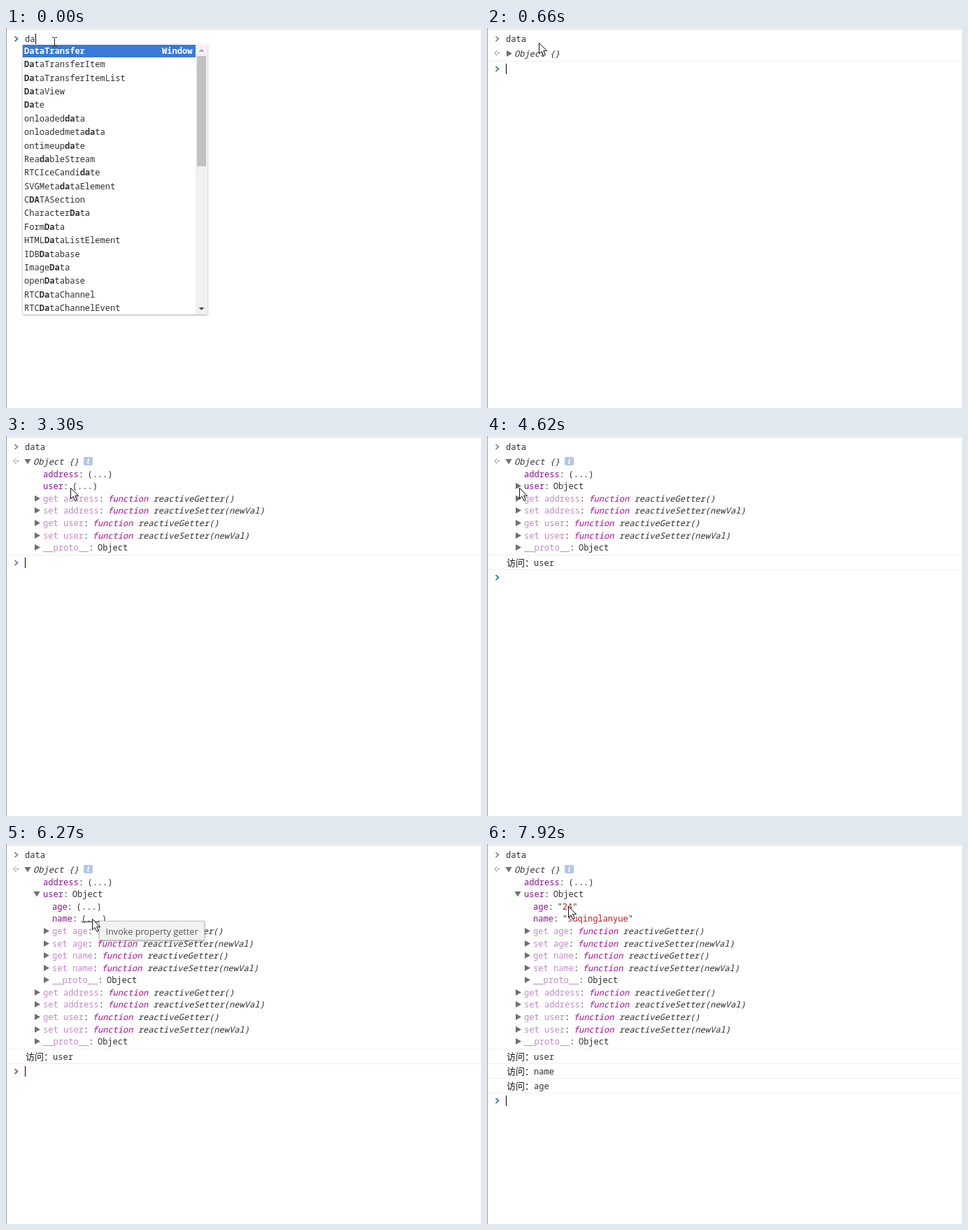
Animation of 679x544 px, one loop 8 s. Source, as an HTML page:

```html
<!DOCTYPE html>
<html lang="zh-CN">
<head>
<meta charset="utf-8">
<style>
html, body { margin: 0; height: 100%; overflow: hidden; background: #fff; }
svg { display: block; width: 100vw; height: 100vh; }
text { font: 12.07px "Noto Sans Mono", monospace; white-space: pre; fill: #303030; }
.b { font-weight: bold; }
.i { font-style: italic; }
.name { fill: #881391; }
.dim { fill: #c389c8; }
.key { fill: #aa0d91; }
.str { fill: #c41a16; }
.white { fill: #fff; }
.cjk { font: 13px "Noto Sans CJK SC", "Noto Sans CJK", sans-serif; fill: #111; }
.info { font: italic bold 11px "Noto Serif", serif; fill: #fff; }
.tip { font: 12.7px "Open Sans", sans-serif; fill: #575757; }
.popup, .tipbox { filter: drop-shadow(0 1px 1.5px rgba(0, 0, 0, .35)); }
</style>
</head>
<body>
<svg id="stage" viewBox="0 0 679 544"></svg>
<script>
const STEP = 330, LOOP = 8000, ROW = 17.57;
const stage = document.getElementById('stage');

// Pointer position at the step where it starts to hold
const pointer = {
  2: [74, 21], 5: [57, 23], 6: [30, 33], 7: [30, 35], 8: [83, 96], 9: [48, 75],
  10: [92, 74], 11: [106, 74], 13: [46, 76], 14: [46, 74], 15: [46, 73], 16: [88, 91],
  17: [107, 94], 19: [123, 107], 20: [233, 107], 21: [112, 98], 22: [116, 89]
};
const hover = { 11: 'user', 17: 'age', 18: 'age', 19: 'name', 22: 'age', 23: 'age' };
const tips = { 18: [114, 104], 19: [133, 110], 23: [129, 103] };
const caretOn = '1111011100111001001110011';
const promptColor = { 0: '#367cd8', 2: '#4b8a50', 7: '#7a78d2', 12: '#3f72b8', 15: '#9a4fa8', 20: '#3f6fc0' };

const early = ['DataTransfer', 'DataTransferItem', 'DataTransferItemList', 'DataView', 'Date',
  'onloadeddata', 'onloadedmetadata', 'ontimeupdate', 'ReadableStream', 'RTCIceCandidate',
  'SVGMetadataElement', 'CDATASection', 'CharacterData', 'FormData', 'HTMLDataListElement',
  'IDBDatabase', 'ImageData', 'openDatabase', 'RTCDataChannel', 'RTCDataChannelEvent'];
const late = early.filter(s => /data/i.test(s))
  .concat('defaultStatus', 'defaultstatus', 'MediaStreamEvent', 'MediaStreamTrack');

const text = (x, y, s, cls = '') => `<text x="${x}" y="${Math.round(y + 4)}" class="${cls}">${s}</text>`;
const span = (s, cls) => `<tspan class="${cls}">${s}</tspan>`;
const rect = (x, y, w, h, fill, more = '') =>
  `<rect x="${x}" y="${y}" width="${w}" height="${h}" fill="${fill}" ${more}/>`;
const path = (d, fill, more = '') => `<path d="${d}" fill="${fill}" ${more}/>`;
const rule = y => rect(1, y, 678, 1, '#f0f0f0');
const chevron = (y, color) =>
  path(`M12.5 ${y - 3.5}l4 3.5-4 3.5`, 'none', `stroke="${color}" stroke-width="1.7"`);
const closed = (x, y) => path(`M${x} ${y - 4.5}l8 4.5-8 4.5z`, '#6e6e6e');
const opened = (x, y) => path(`M${x} ${y - 3.5}h9l-4.5 7.5z`, '#6e6e6e');

// Latest entry at or before step n
const held = (map, n) => {
  while (n > 0 && !(n in map)) n--;
  return map[n];
};

function popup(typed, items) {
  let s = `<g class="popup">${rect(24, 23, 264, 387, '#fff')}</g>` +
    rect(24, 24, 247, 18, '#3879d9') + rect(271, 24, 17, 386, '#f1f1f1') +
    rect(273, 40, 13, typed === 'da' ? 158 : 230, '#c1c1c1') +
    path('M275.5 34l4-4 4 4z', '#a3a3a3') + path('M275.5 400l4 4 4-4z', '#505050');
  items.forEach((item, i) => {
    const label = i ? item.replace(new RegExp(typed, 'i'), m => span(m, 'b')) : item;
    s += text(26, 33 + i * 19.37, label, i ? '' : 'b white');
  });
  return s + text(223, 33, 'Window', 'b white');
}

const func = prop => [['get ' + prop, 'Getter()'], ['set ' + prop, 'Setter(newVal)']].map(([name, end]) => ({
  name, dim: true, arrow: closed, value: span('function', 'i key') + span(' reactive' + end, 'i')
}));
const proto = { name: '__proto__', dim: true, arrow: closed, value: 'Object' };
const quoted = s => `"${span(s, 'str')}"`;

function properties(n) {
  const lazy = (name, value) => value ? { name, value } : { name, value: '(...)', over: hover[n] === name };
  const nest = n < 15 ? [] : [
    lazy('age', n >= 24 && quoted('24')),
    lazy('name', n >= 20 && quoted('suqinglanyue')),
    ...func('age'), ...func('name'), proto
  ].map(p => ({ ...p, deep: true }));
  const user = lazy('user', n >= 12 && 'Object');
  if (n >= 12) user.arrow = n >= 15 ? opened : closed;
  return [lazy('address'), user, ...nest, ...func('address'), ...func('user'), proto];
}

function property(p, y) {
  const x = p.deep ? 66 : 53;
  const valueX = x + (p.name.length + 1) * 7.24 + 5.5;
  let s = text(x, y, span(p.name, p.dim ? 'dim' : 'name') + ':') + text(valueX, y, p.value);
  if (p.arrow) s += p.arrow(x - (p.arrow === opened ? 13.5 : 12), y - .5);
  if (p.over) s += rect(valueX, y + 4, 36, 1, '#303030');
  return s;
}

function arrowCursor([x, y]) {
  return path('M.5.5v15.5l3.6-3.4 2.6 5.9 2.6-1.1-2.6-5.7h5z', '#fff',
    `stroke="#111" transform="translate(${x} ${y})"`);
}

function tooltip([x, y]) {
  return `<g class="tipbox">${rect(x + .5, y + .5, 150, 27, '#f2f2f2', 'stroke="#c4c4c4"')}</g>` +
    text(x + 9.5, y + 15.5, 'Invoke property getter', 'tip');
}

function draw(n) {
  const color = held(promptColor, n);
  let s = rect(0, 0, 679, 544, '#fff') + rect(0, 1, 679, 1, '#d4d4d4') + rect(0, 0, 1, 544, '#a0a0a0');
  if (n < 2) {
    const typed = n ? 'data' : 'da';
    s += chevron(15.5, color) + text(27, 16, typed) + popup(typed, n ? late : early) +
      rect(n ? 56 : 42, 8, 1, 15, '#000') +
      path('M66 13.5h2.5l1 1 1-1h2.5M66 26.5h2.5l1-1 1 1h2.5M69.5 14.5v11', 'none', 'stroke="#222"');
    stage.innerHTML = s;
    return;
  }

  const open = n >= 7;
  s += chevron(15.5, '#8c8c8c') + text(27, 16, 'data') +
    path('M14.5 32.5l-3.5 3.5 3.5 3.5', 'none', 'stroke="#b4b4b4" stroke-width="1.4"') +
    rect(15, 35, 3, 2, '#b4b4b4') +
    (open ? opened(26.5, 36.5) : closed(28, 36.5)) + text(39, 37, 'Object {}', 'i');

  let y = 47;
  if (open) {
    s += rect(111, 30, 13, 12, '#b3c5ec', 'rx="2"') + text(115.5, 36, 'i', 'info');
    const list = properties(n);
    list.forEach((p, i) => s += property(p, Math.floor(55.2 + i * ROW)));
    y = Math.round(47 + list.length * ROW);
  }
  s += rule(y);
  [[12, 'user'], [20, 'name'], [24, 'age']].forEach(([from, prop]) => {
    if (n < from) return;
    s += text(28, y + 11.5, '访问：', 'cjk') + text(67, y + 11.5, prop);
    s += rule(y += 21);
  });
  s += chevron(y + 11.5, color);
  if (caretOn[n] === '1') s += rect(27, y + 4, 1, 15, '#000');
  if (tips[n]) s += tooltip(tips[n]);
  stage.innerHTML = s + arrowCursor(held(pointer, n));
}

let shown = -1;
function tick(now) {
  const n = Math.floor((now % LOOP) / STEP);
  if (n !== shown) draw(shown = n);
  requestAnimationFrame(tick);
}
draw(shown = 0);
requestAnimationFrame(tick);
</script>
</body>
</html>
```
